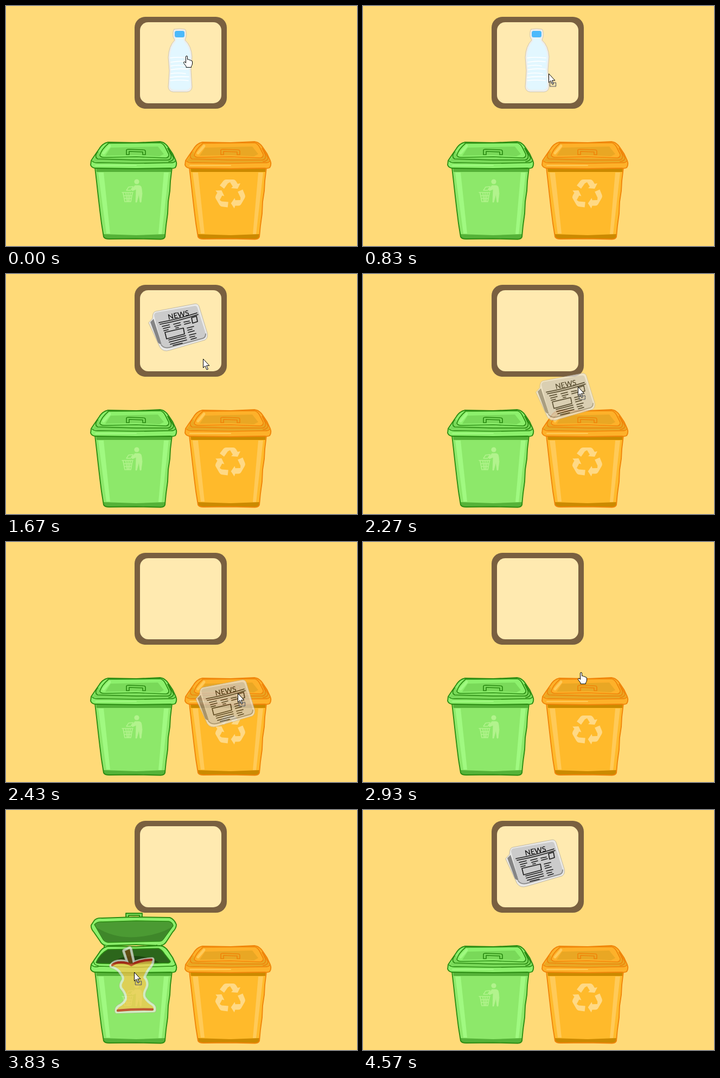
Write an HTML page without scripts that moves like this. It is 647 by 444 pixels and loops after 5.36 s.

```html
<!DOCTYPE html>
<html lang="en">
<head>
<meta charset="utf-8">
<title>Sort the waste</title>
<style>
html, body { margin: 0; width: 100%; height: 100%; overflow: hidden; background: #ffda78; }
svg { display: block; width: 100vw; height: 100vh; }
path { stroke-linecap: round; stroke-linejoin: round; }

.green {
  --body: #8de86a; --light: #a0f981; --edge: #2b8c12; --dark: #55b238;
  --lid: #8cf06c; --shade: #79d959; --icon: #b2f38d;
  --inner: #4b9a33; --inner2: #3f872a; --hole: #2c661b; --deep: #1c4610;
}
.orange {
  --body: #ffba2b; --light: #ffca58; --edge: #f0850a; --dark: #cb8a00;
  --lid: #fdb12a; --shade: #e9a724; --icon: #ffd985;
  --inner: #c98a00; --inner2: #b67a00; --hole: #8d5f00; --deep: #5d4005;
}

/* Every part shares one clock */
.t { animation: 5.36s step-end infinite; }
.pointer { animation-name: move; }
.bottle { animation-name: bottle; }
.paper { animation-name: paper; }
.apple { animation-name: apple; }
.bottle-drag { animation-name: bottle-drag; }
.paper-drag { animation-name: paper-drag; }
.apple-drag { animation-name: apple-drag; }
.orange-open { animation-name: orange-open; }
.green-open { animation-name: green-open; }
.hand { animation-name: hand; }
.arrow { animation-name: arrow; }
.badge { animation-name: badge; }
.ghost { opacity: .7; }

@keyframes move {
  0% { transform: translate(333px, 93px); }
  3.73% { transform: translate(332px, 93px); }
  5.03% { transform: translate(331px, 93px); }
  13.73% { transform: translate(331px, 93px); animation-timing-function: steps(12); }
  21.08% { transform: translate(397px, 286px); animation-timing-function: steps(3); }
  22.94% { transform: translate(400px, 293px); }
  26.79% { transform: translate(400px, 293px); animation-timing-function: steps(7); }
  31.15% { transform: translate(363px, 157px); animation-timing-function: steps(5); }
  34.14% { transform: translate(340px, 80px); }
  36.67% { transform: translate(340px, 80px); animation-timing-function: steps(14); }
  45.33% { transform: translate(427px, 280px); animation-timing-function: steps(3); }
  47.2% { transform: translate(436px, 314px); }
  52.91% { transform: translate(436px, 314px); animation-timing-function: steps(3); }
  54.66% { transform: translate(402px, 242px); animation-timing-function: steps(12); }
  62.12% { transform: translate(316px, 85px); }
  65.22% { transform: translate(316px, 85px); animation-timing-function: steps(5); }
  68.46% { transform: translate(261px, 252px); animation-timing-function: steps(5); }
  71.45% { transform: translate(236px, 300px); }
  81.45% { transform: translate(236px, 300px); animation-timing-function: steps(6); }
  85.26%, 100% { transform: translate(252px, 470px); }
}
@keyframes bottle {
  0% { visibility: visible; }
  17.16%, 100% { visibility: hidden; }
}
@keyframes paper {
  0%, 40.11% { visibility: hidden; }
  29.85%, 83.95%, 100% { visibility: visible; }
}
@keyframes apple {
  0%, 69.03%, 100% { visibility: hidden; }
  55.41% { visibility: visible; }
}
@keyframes bottle-drag {
  0%, 27.42%, 100% { visibility: hidden; }
  17.16% { visibility: visible; }
}
@keyframes paper-drag {
  0%, 47.94%, 100% { visibility: hidden; }
  40.11% { visibility: visible; }
}
@keyframes apple-drag {
  0%, 82.08%, 100% { visibility: hidden; }
  69.03% { visibility: visible; }
}
@keyframes orange-open {
  0%, 28.73%, 53.54%, 100% { visibility: hidden; }
  20.52%, 46.08% { visibility: visible; }
}
@keyframes green-open {
  0%, 82.83%, 100% { visibility: hidden; }
  69.77% { visibility: visible; }
}
@keyframes hand {
  0%, 27.42%, 33.02%, 47.94%, 60.26%, 82.08% { visibility: visible; }
  14.36%, 28.91%, 37.31%, 55.78%, 65.85%, 84.14%, 100% { visibility: hidden; }
}
@keyframes arrow {
  0%, 27.42%, 33.02%, 47.94%, 60.26%, 82.08% { visibility: hidden; }
  14.36%, 28.91%, 37.31%, 55.78%, 65.85%, 84.14%, 100% { visibility: visible; }
}
@keyframes badge {
  0%, 27.42%, 47.94%, 82.08%, 100% { visibility: hidden; }
  14.36%, 37.31%, 65.85% { visibility: visible; }
}
</style>
</head>
<body>
<svg viewBox="0 0 647 444">
  <defs>
    <path id="tub" d="M164 299L167 325 170 352 173 378 176 402 180 427Q182 431 190 431L240 430.500 285 431.500Q292 431 293 427L295 406 298 384 299 362 302 342 303 324 306 299Z"/>
    <g id="bin">
      <use href="#tub" fill="var(--body)"/>
      <path d="M166 300H305L304 307H167Z" fill="var(--dark)"/>
      <path d="M170 308H180L192 421H185Z" fill="var(--light)"/>
      <path d="M291 308H300L287 422H281Z" fill="var(--light)"/>
      <path d="M179 422L240 424 293 422V428Q291 431 285 431H190Q182 431 180 427Z" fill="var(--dark)"/>
      <use href="#tub" fill="none" stroke="var(--edge)" stroke-width="1.9"/>
      <path id="rim" d="M157 286L163 277 172 264Q178 254 188 252L240 253 284 251Q293 252 299 261L307 273 313 286Q316 293 312 299Q308 301 303 300L240 301 166 300Q158 300 156 294Z" fill="var(--lid)" stroke="var(--edge)" stroke-width="1.9"/>
    </g>
    <g id="lid" fill="none" stroke="var(--edge)" stroke-width="1.7">
      <path d="M159 287L172 268 173 279 181 281 296 282 302 276 299 264 312 286 304 290H172Z" fill="var(--shade)" stroke="none"/>
      <path d="M173 276Q176 265 189 254L284 253Q290 254 294 262L300 274Q301 280 295 281L240 279 181 280Q174 280 173 276Z" fill="var(--lid)"/>
      <path d="M193 262L280 260 291 274 283 278 240 276 183 277Z" fill="var(--shade)" stroke="none"/>
      <path d="M180 272L191 259" stroke="var(--light)" stroke-width="5"/>
      <path d="M169 270Q162 279 169 283L240 285 298 285Q306 284 304 275L298 263M159 287Q163 291 172 290L240 291 304 290Q310 290 312 287M300 264L309 281Q308 287 300 288"/>
      <path d="M222 275V267Q222 265 226 265L253 266Q257 266 257 269V275H252V270L227 269V275Z" fill="var(--shade)"/>
      <path d="M165 295H240" stroke="var(--light)" stroke-width="2"/>
    </g>
    <g id="open" stroke="var(--edge)" stroke-width="1.9">
      <path d="M221 199V191H251V199H246V195H226V199Z" fill="var(--shade)"/>
      <path d="M157 213L163 204Q168 199 177 200L235 198 302 199Q310 202 314 212Q314 219 307 226L296 243Q292 250 284 251L240 249 185 251Q177 250 173 242L162 226Q156 219 157 213Z" fill="var(--lid)"/>
      <path d="M163 212Q168 206 178 207L240 205 300 206Q307 208 308 214L290 239Q287 244 279 243L188 245Q181 244 178 238Z" fill="var(--inner)" stroke-width="1.4"/>
      <path d="M166 217Q200 238 240 235T305 217L290 239Q287 243 279 242L188 244Q181 243 178 238Z" fill="var(--inner2)" stroke="none"/>
      <path d="M181 251V256H190V251M278 250V256H287V250" fill="var(--lid)"/>
      <use href="#rim"/>
      <path d="M166 282Q173 266 188 258L240 257 281 256Q287 258 292 266L303 280Q302 284 296 283L240 285 174 284Q167 284 166 282Z" fill="var(--hole)" stroke-width="1.6"/>
      <path d="M196 283Q208 271 234 270T282 282L240 284Z" fill="var(--deep)" stroke="none"/>
      <path d="M158 287Q163 292 172 289L240 291 304 289Q310 289 312 286M162 281Q162 287 170 288" fill="none" stroke-width="1.5"/>
    </g>

    <path id="turn" d="M-19-16L-12-25Q-10-27-7-27H6Q9-27 11-24L14-19 19-20 14-10 2-11 5-14 0-22-4-20-11-10Z"/>
    <g id="recycle" fill="var(--icon)">
      <use href="#turn"/>
      <use href="#turn" transform="rotate(120)"/>
      <use href="#turn" transform="rotate(240)"/>
    </g>
    <g id="litter" fill="none" stroke="var(--icon)" stroke-width="1.4">
      <circle cx="241" cy="325" r="4.6" fill="var(--icon)" stroke="none"/>
      <path d="M238 332H246Q250 333 250 338L251 347 249 363H247L245 348 241 363H239L240 339 233 342 231 339Z" fill="var(--icon)" stroke-width=".8"/>
      <path d="M222 341L226 335 234 334 230 341Z"/>
      <path d="M214 345H234M216 346L219 362H230L233 346M217 351H232M218 356H231M221 346L223 362M225 346V362M229 346L227 362" stroke-width="1.6"/>
    </g>

    <g id="bottle">
      <path d="M310 43Q320 41 330 43Q333 46 332 57L330 63Q342 74 343 94L341 118 343 150Q342 158 334 159H308Q300 158 299 150L301 120 299 95Q300 74 311 63L308 57Q307 46 310 43Z" fill="#eeeeec" stroke="#c9bda3" stroke-width=".8"/>
      <path d="M313 59H327L328 65Q339 76 340 95L338 118 340 148Q339 154 333 155H309Q303 154 302 148L304 118 302 95Q303 76 313 65Z" fill="#e2f7ff"/>
      <rect x="311" y="46" width="18" height="12" rx="3.5" fill="#4bb9fb"/>
      <path d="M303 96Q314 94 337 96M304 104Q320 101 336 103M304 111Q320 108 329 111M304 118Q318 115 336 117M304 125Q316 123 331 125M303 132Q318 130 337 131M303 138Q320 136 336 138" fill="none" stroke="#fff" stroke-width="1.7"/>
    </g>

    <g id="paper">
      <path d="M263 90L270 82Q270 70 276 69L349 55Q354 55 356 60L371 109Q373 118 367 122L302 141Q290 145 284 136Z" fill="#e9e9e7" stroke="#b5ab95" stroke-width=".8"/>
      <path d="M266 89L272 83 287 130Q281 130 279 124Z" fill="#858585"/>
      <path d="M273 77Q273 72 278 71L348 59Q352 59 353 63L368 110Q369 117 363 119L302 136Q291 139 287 131Z" fill="#cbcbcb"/>
      <path d="M286 131Q291 138 301 136L363 119Q368 117 368 111" fill="none" stroke="#8e8e8e" stroke-width="2"/>
      <text transform="translate(299.500 84.500) rotate(-12)" font-family="Lato, 'Open Sans', sans-serif" font-size="13.5" font-weight="600" fill="#151515">NEWS</text>
      <g fill="none" stroke="#1c1c1c" stroke-width="1.7">
        <path d="M282 90Q315 84 352 72M284 93Q318 87 354 75"/>
        <path d="M293 108L327 100 329 111 296 120ZM342 81L351 78 353 88 344 91Z"/>
        <path d="M288 97L301 94M290 101L302 98M291 105L299 103M309 93L321 90M311 97L322 94M313 100L318 99M328 89L338 87M329 93L340 90M334 100L346 97M335 104L343 102M336 108L347 105M338 113L350 110M339 117L348 115M341 121L351 118M300 122L331 114M301 126L332 118M303 130L333 122M308 132L325 128"/>
      </g>
    </g>

    <path id="core" d="M275 73Q280 66 292 66Q303 66 311 72Q322 64 349 62Q350 69 343 76Q335 87 333 95Q341 104 337 113Q330 125 334 133Q340 142 349 147Q353 150 352 155L285 157Q284 151 293 147Q304 139 303 131Q302 122 294 113Q292 108 297 101Q300 94 293 86Q289 78 275 73Z"/>
    <path id="stem" d="M299 46L308 42 314 69 307 70Z"/>
    <g id="fruit">
      <use href="#core"/>
      <use href="#stem"/>
    </g>
    <g id="apple">
      <use href="#fruit" stroke="#b9ad98" stroke-width="9.6"/>
      <use href="#fruit" stroke="#eeeeec" stroke-width="8.2"/>
      <use href="#core" fill="#ffc74f"/>
      <use href="#stem" fill="#784514"/>
      <path d="M276 72Q281 67 292 67Q303 67 311 72Q324 63 348 62M286 156Q318 153 350 154" fill="none" stroke="#d51d1d" stroke-width="4.4"/>
    </g>
  </defs>

  <rect width="647" height="444" fill="#ffda78"/>
  <rect x="237" y="20" width="170" height="170" rx="20" fill="#796040"/>
  <rect x="247" y="30" width="150" height="150" rx="15" fill="#ffeab0"/>

  <use class="t bottle" href="#bottle"/>
  <use class="t paper" href="#paper"/>
  <use class="t apple" href="#apple"/>

  <g class="green">
    <use href="#bin"/>
    <use href="#lid"/>
    <use href="#litter"/>
    <use class="t green-open" href="#open"/>
  </g>
  <g class="orange" transform="translate(174)">
    <use href="#bin"/>
    <use href="#lid"/>
    <use href="#recycle" x="239" y="348"/>
    <use class="t orange-open" href="#open"/>
  </g>

  <g class="t pointer">
    <g class="ghost">
      <use class="t bottle-drag" href="#bottle" x="-332" y="-100"/>
      <use class="t paper-drag" href="#paper" x="-340" y="-80"/>
      <use class="t apple-drag" href="#apple" x="-316" y="-85"/>
    </g>
    <path class="t hand" d="M-1.500 12V1Q-1.500-.6 0-.6T1.500 1V6Q4 5 5 7Q7 6.300 8 8Q10.500 7.800 10.500 10V14Q10 17 8.500 18.500V20.500H-1V18.500L-5.500 12.500Q-6 10-3.500 10.300Z" fill="#fff" stroke="#000"/>
    <path class="t arrow" d="M.5 .5V16.500L4 13 7 20 9.500 19 6.500 12.500H11.500Z" fill="#fff" stroke="#000"/>
    <g class="t badge" fill="none">
      <rect x="2.5" y="16.5" width="11" height="7" stroke="#fff"/>
      <rect x="2.5" y="16.5" width="11" height="7" stroke="#000" stroke-width="1.6" stroke-dasharray="1 1"/>
    </g>
  </g>
</svg>
</body>
</html>
```
